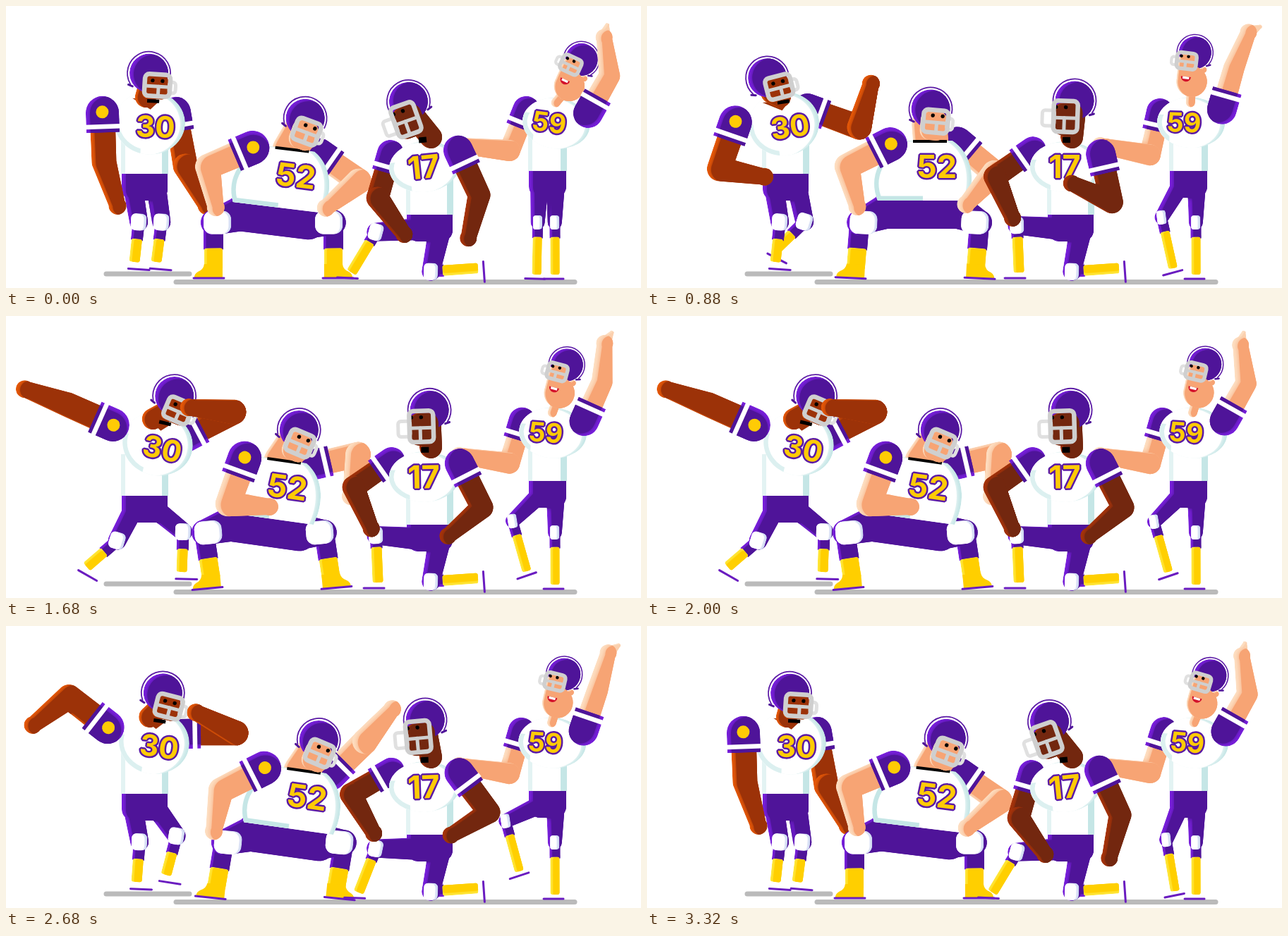
Animation, 900 px wide and 400 px high, one loop 3360 ms. Source, as an HTML page with a canvas:

```html
<!DOCTYPE html>
<html lang="en">
<head>
<meta charset="utf-8">
<title>Touchdown dance</title>
<style>
html, body { margin: 0; width: 100%; height: 100%; overflow: hidden; background: #fff; }
canvas { display: block; }
</style>
</head>
<body>
<canvas id="stage" width="900" height="400"></canvas>
<script>
const ctx = document.getElementById('stage').getContext('2d');
const LOOP = 3360, RAD = Math.PI / 180;
const PURPLE = '#4f1499', VIOLET = '#7a20de', MINT = '#c5e6e6', GOLD = '#ffcb05';
const PEACH = ['#f7a474', '#fde0c4'];

// Time windows in which the players change pose
const SNAP = [[60, 300], [400, 640], [1100, 1340], [1400, 1660], [2290, 2640], [2780, 3180]];
const SWAY = [[0, 320], [320, 880], [880, 1360], [1360, 2000], [2000, 2680], [2680, 3320]];

// Each player is a jointed rig: keys hold one value per pose (degrees or pixels),
// and body, feet and derive turn those values into the rest of the pose.
const players = [
  {
    number: '30', font: 42, steps: SNAP, skin: ['#9c3208', '#e85a08'], facing: 1, size: 1,
    waist: [163, 230], belt: 238, chestBox: [-8, -5, 50, 45],
    thigh: [14, 13], shin: 7.5, sock: .43, pad: [22, 24], sole: [-8, 22, 11], footTurn: [.6, .6],
    legBones: [49, 56], kneeSide: 1, arm: [18, 17.5, 11.5], sleeve: 23.5, badge: true,
    shoulders: [[-76, -17], [28, -22]], frontBones: [70, 65], backBones: [78, 64],
    head: [-14, -75], nod: [0, 1.8], neck: [-14, -42, 15], collar: [-13, 4, -36, 5], vNeck: true,
    jaw: [-8, 2, 36, 34, 8], mask: [-5, 1, 36, 31, 9], eyes: [6, 20, 10],
    keys: {
      tilt: [2, -8, -8, 3, 13, 8], drop: [0, 0, 0, 17, 17, 0],
      frontUp: [88, 129, 109, 149, 204, 218], frontLow: [73, 22, 10, 6, 200, 142],
      backUp: [80, 20, 20, 0, -28, -1], backLow: [62, -38, -75, -86, -174, -153],
      leftX: [182, 182, 182, 160, 115, 185], leftY: [362, 362, 362, 345, 355, 362],
      rightX: [213, 206, 183, 249, 249, 227], rightY: [362, 330, 345, 362, 362, 352]
    },
    body: v => [210 + .9 * v.tilt, 171 + v.drop],
    feet: v => [[v.leftX, v.leftY], [v.rightX, v.rightY]]
  },
  {
    number: '59', font: 38, steps: SWAY, skin: PEACH, facing: -1, size: .84,
    waist: [740, 795], belt: 234, chestBox: [10, 0, 48, 36],
    thigh: [13, 10], shin: 6.5, sock: .28, pad: [13, 20], sole: [-16, 12, 7], footTurn: [1.2, 1],
    legBones: [53, 73], kneeSide: -1, arm: [16, 15, 11], sleeve: 21,
    shoulders: [[53, -20], [-35, -14]], frontBones: [61, 55], backBones: [63, 72], grip: [642, 198],
    head: [4, -100], nod: [0, 3.3], neck: [9, -28, 6.5], chin: true,
    jaw: [-6, 0, 32, 60, 16], mask: [-4, 2, 33, 27, 10], eyes: [10, 22, 8],
    keys: {
      tilt: [7.5, -5, 2, 5, 4, 4, 5], lift: [0, 18, 9, 20, 18, 33, 5],
      wave: [.5, 0, 1, .9, .5, .9, .5]
    },
    body: v => [758 + 1.6 * v.tilt, 165],
    feet: v => [[752 - .75 * v.lift, 380 - v.lift], [778, 380]],
    derive: v => ({
      frontUp: -47 - 27 * v.wave, frontLow: -128 + 60 * v.wave, finger: -126 + 100 * v.wave
    })
  },
  {
    number: '52', font: 45, steps: SNAP, skin: PEACH, facing: 1, size: 1, belly: true,
    thigh: [26, 18], shin: 13, sock: .56, pad: [39, 33], sole: [-15, 28, 14], footTurn: [.6, .6],
    arm: [19, 18, 11.5], sleeve: 24, badge: true,
    shoulders: [[-66, -32], [29, -35]], frontBones: [69, 59], backBones: [68, 60],
    head: [-9, -82], nod: [5, 2.2], neck: [-9, -36, 25], collar: [-34, 14, -36, 4],
    jaw: [-13, 2, 38, 42, 14], mask: [-9, 1, 35, 32, 8], eyes: [4, 18, 9],
    keys: {
      tilt: [7, -7, 0, 7, 8, 8], x: [411, 376, 411, 410, 399, 427],
      frontUp: [157, 134, 153, 155, 110, 153], frontLow: [79, 24, 76, 39, 4, 100],
      backUp: [35, 25, 40, 34, -13, -45], backLow: [141, 93, 132, 143, 100, -50]
    },
    body: v => [v.x, 228 + 1.8 * Math.abs(v.tilt)]
  },
  {
    number: '17', font: 45, steps: SNAP, skin: ['#73270f', '#a8340a'], facing: -1, size: 1,
    waist: [567, 634], belt: 296, chestBox: [1, 0, 50, 36],
    thigh: [16, 13], shin: 7.5, sock: .25, pad: [20, 24], sole: [-20, 9, 9], footTurn: [.1, 1],
    legBones: [62, 66], kneeSide: -1, arm: [17, 16, 11], sleeve: 21,
    shoulders: [[51, -18], [-45, -24]], frontBones: [70, 63], backBones: [66, 64],
    head: [14, -94], nod: [2, 3.6], neck: [10, -42, 16], collar: [-3, 8, -38, 8],
    jaw: [-12, 4, 42, 46, 14], mask: [-5, 1, 34, 44, 17], eyes: [12, 26, 10],
    keys: {
      tilt: [-6, 0, 0, 0, -1, -2], foot: [490, 527, 527, 527, 527, 500],
      frontUp: [65, 61, 77, 183, 63, 53], frontLow: [104, 116, 205, 251, 140, 149],
      backUp: [106, 142, 145, 145, 145, 150], backLow: [54, 42, 67, 67, 67, 60]
    },
    body: () => [592, 228],
    feet: v => [[v.foot, 377], [668, 372]]
  }
];

const polar = ([x, y], len, deg) => [x + Math.cos(deg * RAD) * len, y + Math.sin(deg * RAD) * len];

// Point given in the chest's own axes, turned by deg
const place = ([cx, cy], [x, y], deg) => {
  const c = Math.cos(deg * RAD), s = Math.sin(deg * RAD);
  return [cx + x * c - y * s, cy + x * s + y * c];
};

const heading = (a, b) => Math.atan2(b[1] - a[1], b[0] - a[0]);

// Middle joint of a two-bone limb from a to b
function bend(a, b, [l1, l2], side) {
  const d = Math.min(Math.hypot(b[0] - a[0], b[1] - a[1]), l1 + l2 - .01);
  const k = Math.acos((l1 * l1 + d * d - l2 * l2) / (2 * l1 * d));
  return polar(a, l1, (heading(a, b) - side * k) / RAD);
}

function reach(shoulder, up, low, [l1, l2]) {
  const elbow = polar(shoulder, l1, up);
  return [shoulder, elbow, polar(elbow, l2, low)];
}

function values(p, t) {
  let k = 0, u = 0;
  p.steps.forEach(([a, b], i) => {
    if (t >= a) { k = i; u = Math.min(1, (t - a) / (b - a)); }
  });
  u = u * u * (3 - 2 * u);
  const v = {};
  for (const [name, row] of Object.entries(p.keys)) {
    const from = row[k], to = row[(k + 1) % row.length];
    v[name] = from + (to - from) * u;
  }
  return p.derive ? { ...v, ...p.derive(v) } : v;
}

function within([x, y], angle, draw) {
  ctx.save();
  ctx.translate(x, y);
  ctx.rotate(angle);
  draw();
  ctx.restore();
}

// Fill a path with a soft lighter edge
function paint(path, base, light, shift = 6) {
  ctx.save();
  ctx.clip(path);
  ctx.fillStyle = light;
  ctx.fill(path);
  ctx.translate(shift, Math.abs(shift) * .2);
  ctx.shadowColor = ctx.fillStyle = base;
  ctx.shadowBlur = Math.abs(shift);
  ctx.fill(path);
  ctx.restore();
}

function taper(path, a, b, ra, rb) {
  const g = heading(a, b), q = Math.PI / 2;
  path.moveTo(a[0] + Math.cos(g + q) * ra, a[1] + Math.sin(g + q) * ra);
  path.arc(a[0], a[1], ra, g + q, g + 3 * q);
  path.arc(b[0], b[1], rb, g - q, g + q);
  path.closePath();
  return path;
}

function line(x1, y1, x2, y2, width, color, cap = 'round') {
  ctx.lineWidth = width;
  ctx.strokeStyle = color;
  ctx.lineCap = cap;
  ctx.beginPath();
  ctx.moveTo(x1, y1);
  ctx.lineTo(x2, y2);
  ctx.stroke();
}

function dot(x, y, r, color) {
  ctx.fillStyle = color;
  ctx.beginPath();
  ctx.arc(x, y, r, 0, 7);
  ctx.fill();
}

function box(x, y, w, h, r) {
  const path = new Path2D();
  path.roundRect(x, y, w, h, r);
  return path;
}

function drawForearm(p, [, elbow, hand], path = new Path2D()) {
  const [, mid, end] = p.arm;
  taper(path, elbow, hand, mid, end);
  path.moveTo(hand[0] + end + 1, hand[1]);
  path.arc(hand[0], hand[1], end + 1, 0, 7);
  paint(path, ...p.skin, p.skin === PEACH ? 8 : 6);
}

function drawArm(p, limb, width, badge) {
  const [s, e] = limb;
  drawForearm(p, limb, taper(new Path2D(), s, e, p.arm[0] * width, p.arm[1]));
  within(s, heading(s, e) - Math.PI / 2, () => {
    const w = p.sleeve * width;
    paint(box(-w, -w, 2 * w, w + 28, [w, w, 0, 0]), PURPLE, VIOLET);
    ctx.fillStyle = '#fff';
    ctx.fillRect(-w - 1, 16.5, 2 * w + 2, 6.5);
    if (badge) dot(0, -1, 9, GOLD);
  });
}

// Hips and the two legs, each as hip, knee, ankle
function stance(p, v, chest, belt) {
  if (p.belly) {
    const hips = [-67, 25].map(x => place(chest, [x, 61], v.tilt));
    const shift = (hips[0][0] + hips[1][0]) / 2 - 383;
    return [294, 464].map((x, i) => [hips[i], [x + shift, 307], [x + shift * .25, 372]]);
  }
  const inset = p.thigh[0] + 3, [x0, x1] = p.waist;
  return p.feet(v).map((ankle, i) => {
    const hip = [i ? x1 - inset : x0 + inset, belt + 20];
    return [hip, bend(hip, ankle, p.legBones, p.kneeSide), ankle];
  });
}

function drawBoot(drop) {
  const boot = new Path2D();
  boot.moveTo(-13, -6);
  boot.lineTo(13, -6);
  boot.quadraticCurveTo(14, 2, 22, 5);
  boot.quadraticCurveTo(27, 8, 27, drop - 1);
  boot.lineTo(-13, drop - 1);
  ctx.fillStyle = '#ffcf00';
  ctx.fill(boot);
}

function drawLegs(p, legs, belt) {
  const pants = new Path2D(), [w, h] = p.pad, [heel, toe, drop] = p.sole;
  if (p.belly) taper(pants, legs[0][0], legs[1][0], 27, 27);
  else pants.roundRect(p.waist[0] + 1, belt - 4, p.waist[1] - p.waist[0] - 2, 42, [0, 0, 16, 16]);
  for (const i of [1, 0]) {
    const [hip, knee, ankle] = legs[i];
    const turn = heading(knee, ankle) - Math.PI / 2;
    const len = Math.hypot(ankle[0] - knee[0], ankle[1] - knee[1]), r = p.shin;
    within(knee, turn, () => {
      paint(box(-r - 1, 0, 2 * r + 2, len * p.sock + 2, 0), PURPLE, VIOLET, 4);
      paint(box(-r, len * p.sock, 2 * r, len * (1 - p.sock) + 1, 3), '#ffcf00', '#ffe83d', 4);
    });
    within(ankle, turn * p.footTurn[i], () => {
      if (p.belly && i === 0) ctx.scale(-1, 1);
      if (p.belly) drawBoot(drop);
      line(heel, drop, toe, drop, 3, '#6a1cc0');
    });
    taper(pants, hip, knee, ...p.thigh);
  }
  paint(pants, PURPLE, VIOLET);
  legs.forEach(([, knee, ankle], i) => {
    const turn = heading(knee, ankle) - Math.PI / 2;
    const inward = p.belly ? 6 - 12 * i : 0;
    within([knee[0] + inward, knee[1]], Math.sin(2 * turn) * .3, () =>
      paint(box(-w / 2, -h / 2, w, h, w * .3), '#fff', '#cdd7f2', -4));
  });
}

function drawNumber(p) {
  const base = p.font * .364;
  ctx.font = `700 ${p.font}px Inter, "Open Sans", sans-serif`;
  ctx.textAlign = 'center';
  ctx.lineJoin = 'bevel';
  ctx.strokeStyle = '#5b1aa5';
  ctx.lineWidth = 5;
  ctx.strokeText(p.number, 0, base);
  ctx.fillStyle = GOLD;
  ctx.fillText(p.number, 0, base);
}

function drawTorso(p, chest, tilt, belt) {
  if (!p.belly) {
    const [x0, x1] = p.waist, top = chest[1] + 8;
    for (const [x, w, color] of [[x0, x1 - x0, '#fff'], [x1 - 9, 9, MINT], [x0, 6, '#e3f3f3']]) {
      ctx.fillStyle = color;
      ctx.fillRect(x, top, w, belt - top);
    }
  }
  within(chest, tilt * RAD, () => {
    const path = new Path2D();
    if (p.belly) {
      path.moveTo(-42, -37);
      path.bezierCurveTo(-82, -20, -98, 15, -84, 48);
      path.lineTo(44, 48);
      path.bezierCurveTo(56, 10, 46, -22, 22, -37);
      path.closePath();
    } else {
      path.ellipse(...p.chestBox, 0, 0, 7);
    }
    paint(path, '#fff', MINT, -7);
    ctx.save();
    ctx.clip(path);
    ctx.beginPath();
    ctx.rect(-100, p.belly ? -20 : -10, 80, 80);
    ctx.clip();
    ctx.strokeStyle = p.belly ? MINT : '#dcf0f0';
    ctx.lineWidth = 13;
    ctx.stroke(path);
    ctx.restore();
    drawNumber(p);
    if (p.vNeck) {
      ctx.fillStyle = p.skin[0];
      ctx.beginPath();
      ctx.moveTo(-34, -39);
      ctx.lineTo(-8, -24);
      ctx.lineTo(5, -37);
      ctx.fill();
    }
  });
}

function drawNeck(p, head, chest, nod) {
  const [x, y, r] = p.neck;
  const top = place(head, [0, p.chin ? 42 : 22], nod);
  paint(taper(new Path2D(), top, [chest[0] + x, chest[1] + y], r, r), ...p.skin, 4);
}

function drawHead(p, head, nod) {
  within(head, nod * RAD, () => {
    ctx.scale(p.facing * p.size, p.size);
    ctx.strokeStyle = '#5b1aa5';
    ctx.lineWidth = 1.8;
    ctx.beginPath();
    ctx.arc(0, 0, 30.5, 2.55, 6.4);
    ctx.stroke();
    line(-28, 18, -22, 20, 3, PURPLE);
    const ball = new Path2D();
    ball.arc(0, 0, 27.5, 0, 7);
    paint(ball, PURPLE, VIOLET, 6 * p.facing);
    const face = box(...p.jaw);
    if (p.chin) {
      face.moveTo(26, 49);
      face.arc(0, 49, 26, 0, 7);
      face.moveTo(-13, 27);
      face.arc(-18, 27, 5, 0, 7);
    }
    paint(face, ...p.skin, 3 * p.facing);
    if (p.chin) {
      ctx.fillStyle = '#d3122b';
      ctx.beginPath();
      ctx.arc(10.5, 42, 8.5, 0, Math.PI);
      ctx.fill();
      ctx.fillStyle = '#fff';
      ctx.fillRect(5, 42, 11, 4);
    }
    const [e1, e2, ey] = p.eyes, [mx, my, w, h, out] = p.mask;
    dot(e1, ey, 2.7, '#000');
    dot(e2, ey, 2.7, '#000');
    const mid = my + h * .55;
    ctx.lineWidth = 5;
    ctx.strokeStyle = '#e0e0e0';
    ctx.stroke(box(mx + w - 1, my + h * .32, out, h * .5, 4));
    ctx.lineWidth = 6.5;
    ctx.strokeStyle = '#cfcfcf';
    ctx.stroke(box(mx, my, w, h, 6));
    line(mx, mid, mx + w, mid, 5, '#cfcfcf');
    line(mx + w * .55, mid, mx + w * .55, my + h, 5, '#cfcfcf');
  });
}

function drawPlayer(p, t) {
  const v = values(p, t), chest = p.body(v), belt = p.belt + (v.drop || 0);
  const [base, gain] = p.nod, nod = base + gain * v.tilt;
  const head = place(chest, p.head, gain * v.tilt);
  const [fs, bs] = p.shoulders.map(s => place(chest, s, v.tilt));
  const front = reach(fs, v.frontUp, v.frontLow, p.frontBones);
  const back = p.grip ? [bs, bend(bs, p.grip, p.backBones, 1), p.grip]
    : reach(bs, v.backUp, v.backLow, p.backBones);

  drawLegs(p, stance(p, v, chest, belt), belt);
  drawArm(p, back, .9, false);
  if (p.belly) drawNeck(p, head, chest, nod);
  drawTorso(p, chest, v.tilt, belt);
  if (!p.belly) drawNeck(p, head, chest, nod);
  if (p.collar) {
    const [x1, x2, y, width] = p.collar;
    within(chest, v.tilt * RAD, () => line(x1, y, x2, y, width, '#000', 'butt'));
  }
  drawHead(p, head, nod);
  if (p.grip) {
    const tip = polar(front[2], 18, v.finger);
    paint(taper(new Path2D(), front[2], tip, 10, 3), '#fbd0ae', p.skin[1], 4);
  }
  drawArm(p, front, 1, p.badge);
  drawForearm(p, back);
}

function frame(now) {
  const t = now % LOOP;
  ctx.fillStyle = '#fff';
  ctx.fillRect(0, 0, 900, 400);
  line(142, 380, 260, 380, 7, '#bababa');
  line(241, 391.5, 806, 391.5, 7, '#bababa');
  for (const p of players) drawPlayer(p, t);
}

const start = performance.now();
function tick(now) {
  frame(Math.max(0, now - start));
  requestAnimationFrame(tick);
}
requestAnimationFrame(tick);
</script>
</body>
</html>
```
